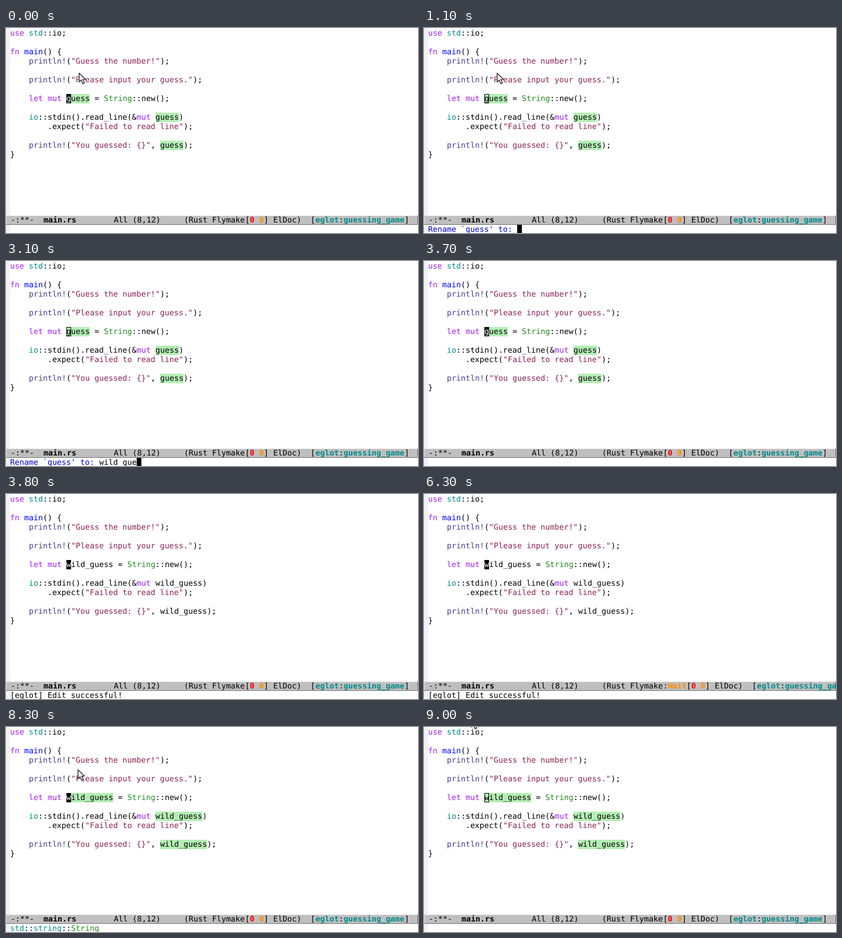
Write an HTML page that moves like this. It is 703 px wide and 351 px high and loops after 9.1 s.

```html
<!DOCTYPE html>
<html lang="en">
<head>
<meta charset="utf-8">
<title>Renaming a variable</title>
<style>
  html, body { margin: 0; width: 100%; height: 100%; overflow: hidden; background: #fff; }
  svg { display: block; width: 703px; height: 351px; }
  text {
    font: 13.288px "DejaVu Sans Mono", monospace;
    white-space: pre;
    text-rendering: geometricPrecision;
  }
  .bold { font-weight: bold; }
</style>
</head>
<body>
<svg id="stage" viewBox="0 0 703 351" xmlns="http://www.w3.org/2000/svg">
  <rect width="703" height="351" fill="#fff"/>
  <rect width="7" height="351" fill="#f2f2f2"/>
  <g id="code"></g>
  <rect y="321" width="703" height="16" fill="#bfbfbf"/>
  <path d="M.5 337V321.5H703" fill="none" stroke="#e5e5e5"/>
  <path d="M0 336.5H702.5V321" fill="none" stroke="#737373"/>
  <g id="mode" transform="translate(1)"></g>
  <g id="echo"></g>
  <path id="pointer" d="M.7 .9V16.2L4.2 13L7 19.2L10 17.9L7.2 11.9L11.9 11.6Z"
        fill="#e8e8e8" stroke="#333" stroke-width="1.4" stroke-linejoin="round"/>
</svg>
<script>
const LOOP = 9100, CELL = 8, LINE = 16, LEFT = 7, TOP = 1;
const MODE_ROW = 20, ECHO_ROW = 21, CURSOR_ROW = 7, CURSOR_COL = 12;

const COLOR = {
  plain: '#000', keyword: '#a020f0', constant: '#008b8b', func: '#0000ff',
  macro: '#483d8b', string: '#8b2252', type: '#228b22', prompt: '#0000cd',
  error: '#ff0000', warn: '#ff8c00', mark: '#b4eeb4'
};

const $ = id => document.getElementById(id);
const esc = s => s.replace(/&/g, '&amp;').replace(/</g, '&lt;');
const cellX = col => LEFT + col * CELL;
const rowY = row => TOP + row * LINE;

function glyphs(row, col, s, fill, bold) {
  return `<text x="${cellX(col)}" y="${rowY(row) + 12}" fill="${fill}"` +
    `${bold ? ' class="bold"' : ''}>${esc(s)}</text>`;
}

function block(row, col, n, fill) {
  return `<rect x="${cellX(col)}" y="${rowY(row)}" width="${n * CELL}" height="${LINE}" fill="${fill}"/>`;
}

// A run is plain text or [style, text]; a leading "*" on the style means bold.
function line(row, runs, marked) {
  let col = 0, out = '';
  for (const run of runs) {
    const [style, s] = Array.isArray(run) ? run : ['plain', run];
    const bold = style[0] === '*', name = bold ? style.slice(1) : style;
    const mark = name === 'mark';
    if (mark && marked) out += block(row, col, s.length, COLOR.mark);
    if (s.trim()) out += glyphs(row, col, s, mark ? COLOR.plain : COLOR[name], bold);
    col += s.length;
  }
  return out;
}

function codeView({ name, marked, solid }) {
  const v = ['mark', name];
  const print = (s, ...rest) => ['    ', ['macro', 'println!'], '(', ['string', s], ...rest, ');'];
  const rows = {
    0: [['keyword', 'use'], ' ', ['constant', 'std'], '::io;'],
    2: [['keyword', 'fn'], ' ', ['func', 'main'], '() {'],
    3: print('"Guess the number!"'),
    5: print('"Please input your guess."'),
    7: ['    ', ['keyword', 'let mut'], ' ', v, ' = ', ['type', 'String'], '::new();'],
    9: ['    ', ['constant', 'io'], '::stdin().read_line(&', ['keyword', 'mut'], ' ', v, ')'],
    10: ['        .expect(', ['string', '"Failed to read line"'], ');'],
    12: print('"You guessed: {}"', ', ', v),
    13: ['}']
  };
  const text = Object.entries(rows).map(([r, runs]) => line(+r, runs, marked)).join('');
  const cursor = solid
    ? block(CURSOR_ROW, CURSOR_COL, 1, '#000') + glyphs(CURSOR_ROW, CURSOR_COL, name[0], '#fff')
    : `<rect x="${cellX(CURSOR_COL) + .5}" y="${rowY(CURSOR_ROW) + .5}" width="7" height="15" fill="none" stroke="#000"/>`;
  return text + cursor;
}

function modeView({ busy }) {
  return line(MODE_ROW, [
    '-:**-  ', ['*plain', 'main.rs'], '        All (8,12)     (Rust Flymake',
    ...(busy === 'wait' ? [':', ['*warn', 'Wait']] : []),
    '[', ['*error', '0'], ' ', ['*warn', '0'], '] ElDoc)  [',
    ['*constant', 'eglot'], ':', ['*constant', 'guessing_game'],
    ...(busy === 'index' ? ['/', ['*warn', 'Indexing']] : []),
    ']'
  ]);
}

function echoView({ echo, caret }) {
  const col = echo.reduce((n, r) => n + (Array.isArray(r) ? r[1] : r).length, 0);
  return line(ECHO_ROW, echo) + (caret ? block(ECHO_ROW, col, 1, '#000') : '');
}

// Keystrokes come in short bursts, one letter per step.
function typed(t) {
  const burst = (start, n, step) => Math.max(0, Math.min(n, Math.floor((t - start) / step) + 1));
  const n = burst(1900, 1, 100) + burst(2100, 3, 100) + burst(2700, 1, 100) +
    burst(2900, 3, 100) + burst(3300, 2, 200);
  return 'wild_guess'.slice(0, n);
}

function echoAt(t) {
  const mx = ['prompt', 'M-x '];
  if (t < 300) return [];
  if (t < 500) return [mx];
  if (t < 1100) return [mx, 'eglot-rename'];
  if (t < 3700) return [['prompt', "Rename `guess' to: "], typed(t)];
  if (t < 3800) return [];
  if (t < 8000) return ['[eglot] Edit successful!'];
  if (t < 9000) return [['constant', 'std'], '::', ['constant', 'string'], '::', ['type', 'String']];
  return [];
}

function pointerAt(t) {
  if (t < 1900) return [124, 76.3];
  if (t < 8200) return null;
  const u = (t - 8200) / 800, e = u * u * (3 - 2 * u);
  return [124 - 44 * e, 76.3 - 92.3 * e];
}

function stateAt(t) {
  return {
    name: t < 3800 ? 'guess' : 'wild_guess',
    marked: t < 3800 || t >= 8000,
    solid: t < 300 || (t >= 3700 && t < 9000),
    busy: t >= 6300 && t < 7900 ? 'wait' : t >= 7900 && t < 8000 ? 'index' : '',
    echo: echoAt(t),
    caret: t >= 1100 && t < 3700
  };
}

let shown = -1;
function draw(ms) {
  const t = Math.floor((ms % LOOP) / 100) * 100;
  if (t === shown) return;
  shown = t;
  const s = stateAt(t), p = pointerAt(t);
  $('code').innerHTML = codeView(s);
  $('mode').innerHTML = modeView(s);
  $('echo').innerHTML = echoView(s);
  $('pointer').style.display = p ? '' : 'none';
  if (p) $('pointer').setAttribute('transform', `translate(${p})`);
}

const start = performance.now();
function tick() {
  draw(performance.now() - start);
  requestAnimationFrame(tick);
}
tick();
</script>
</body>
</html>
```
